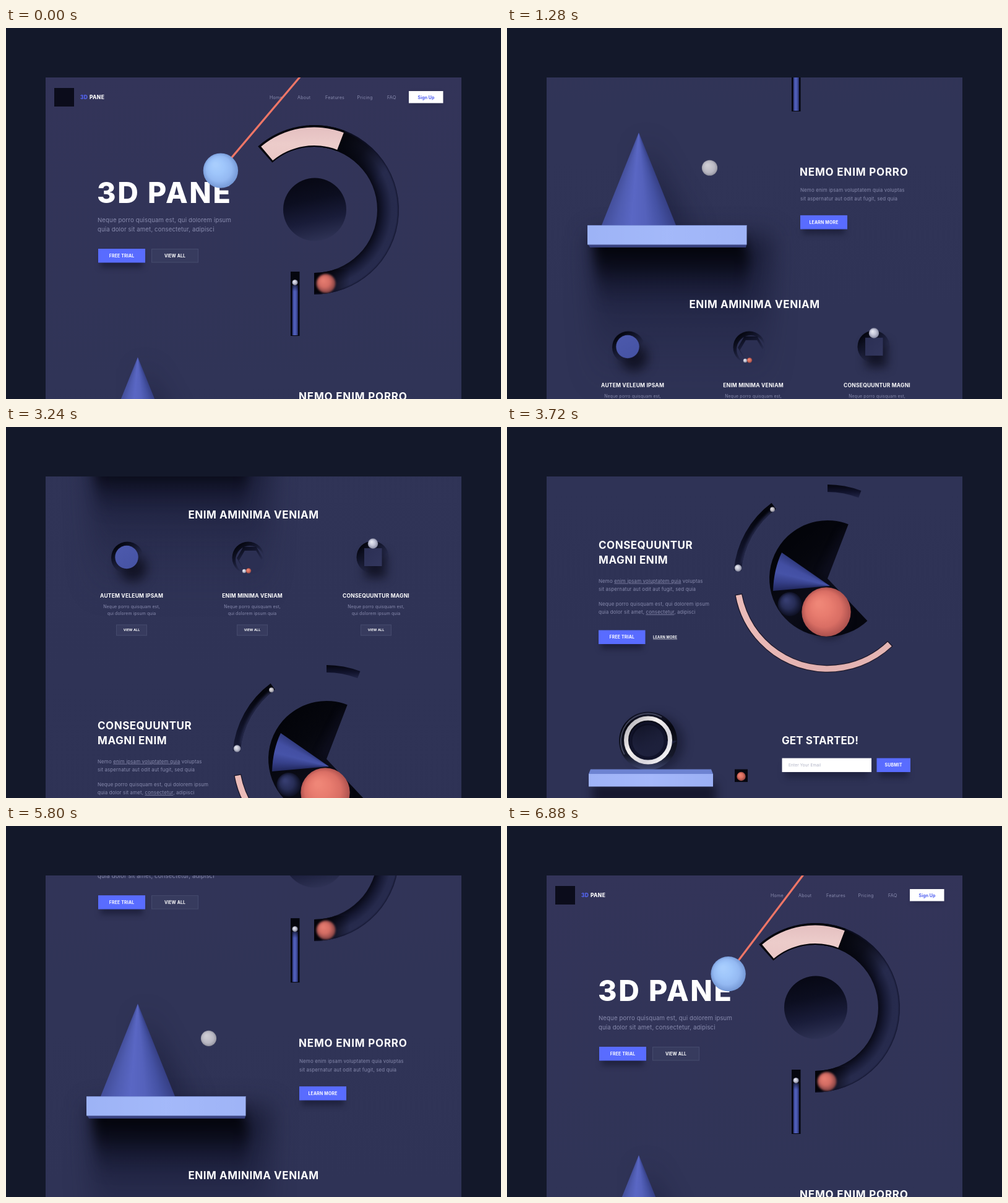
These frames come from a looping animation (800x600 px, 6.92 s). An HTML page with a canvas:

```html
<!DOCTYPE html>
<html lang="en">
<head>
<meta charset="utf-8">
<title>3D PANE</title>
<style>
  html, body { margin: 0; width: 100%; height: 100%; overflow: hidden; background: #13182a; }
  #view { position: absolute; left: 64px; top: 80px; width: 672px; height: 520px; overflow: hidden; background: #303457; }
  #page { position: absolute; left: -64px; top: -80px; width: 800px; height: 1580px; will-change: transform; }
  #page > * { position: absolute; left: 0; top: 0; }
  text { font-family: Inter, "Open Sans", sans-serif; white-space: pre; }
  .u { text-decoration: underline; }
</style>
</head>
<body>
<div id="view">
  <div id="page">
    <canvas id="scene" width="800" height="1580"></canvas>
    <svg id="copy" width="800" height="1580"></svg>
    <canvas id="actors" width="800" height="720"></canvas>
  </div>
</div>
<script>
const LOOP = 6920;
const BLUE = '#596cff', MUTED = '#888bae', WHITE = '#ffffff';
const page = document.getElementById('page');
const copy = document.getElementById('copy');
const g = document.getElementById('scene').getContext('2d');
const a = document.getElementById('actors').getContext('2d');
const rad = d => d * Math.PI / 180;

// ---- drawing helpers
function stops(f, colors, from = 0, to = 1) {
  colors.forEach((k, i) => f.addColorStop(from + (to - from) * i / (colors.length - 1), k));
  return f;
}
function fade(c, x0, y0, x1, y1, ...colors) {
  return stops(c.createLinearGradient(x0, y0, x1, y1), colors);
}
function glow(c, x0, y0, r0, x1, y1, r1, ...colors) {
  return stops(c.createRadialGradient(x0, y0, r0, x1, y1, r1), colors);
}
function sweep(x, y, d0, d1, ...colors) {
  return stops(g.createConicGradient(0, x, y), colors, d0 / 360, d1 / 360);
}
function rect(x, y, w, h, fill) {
  g.fillStyle = fill;
  g.fillRect(x, y, w, h);
}
function disc(c, x, y, r, fill) {
  c.beginPath();
  c.arc(x, y, r, 0, 7);
  c.fillStyle = fill;
  c.fill();
}
function ball(c, x, y, r, ...colors) {
  disc(c, x, y, r, glow(c, x - r * .3, y - r * .35, r * .1, x, y, r * 1.05, ...colors));
}
function poly(fill, ...p) {
  g.beginPath();
  for (let i = 0; i < p.length; i += 2) g.lineTo(p[i], p[i + 1]);
  g.closePath();
  g.fillStyle = fill;
  g.fill();
}
function band(x, y, r0, r1, d0, d1) {
  g.beginPath();
  g.arc(x, y, r1, rad(d0), rad(d1));
  g.arc(x, y, r0, rad(d1), rad(d0), true);
  g.closePath();
}
function soft(blur, draw) {
  g.save();
  g.filter = `blur(${blur}px)`;
  draw();
  g.restore();
}
function inside(draw) {
  g.save();
  g.clip();
  draw();
  g.restore();
}

// ---- text helpers
function text(str, x, y, size, weight, fill, spacing = 0, anchor = 'start') {
  const n = document.createElementNS('http://www.w3.org/2000/svg', 'text');
  const set = { x, y, fill, 'font-size': size, 'font-weight': weight, 'letter-spacing': spacing, 'text-anchor': anchor };
  for (const k in set) n.setAttribute(k, set[k]);
  str.split('_').forEach((part, i) => {
    const s = document.createElementNS(n.namespaceURI, 'tspan');
    s.textContent = part;
    if (i % 2) s.setAttribute('class', 'u');
    n.append(s);
  });
  copy.append(n);
}
const title = (s, x, y, gap = .55, anchor) => text(s, x, y, 17, 700, WHITE, gap, anchor);
const body = (s, x, y) => text(s, x, y, 7.9, 400, MUTED, .15);

function button(label, x, y, w, h = 22.5) {
  soft(5, () => rect(x + 4, y + 8, w - 8, h, 'rgba(14,16,38,.5)'));
  rect(x, y, w, h, BLUE);
  text(label, x + w / 2, y + h / 2 + 2.5, 6.9, 700, WHITE, .2, 'middle');
}
function ghost(x, y, w, h, size) {
  rect(x, y, w, h, '#373b5e');
  g.strokeStyle = '#454a6d';
  g.lineWidth = 1;
  g.strokeRect(x + .5, y + .5, w - 1, h - 1);
  text('VIEW ALL', x + w / 2, y + h / 2 + size * .37, size, 700, WHITE, .15, 'middle');
}

// ---- page sections
function header() {
  rect(78, 97, 32, 30, '#0b0c1b');
  text('3D', 120, 115, 8.4, 800, '#5566f5', .35);
  text('PANE', 135, 115, 8.4, 800, WHITE, .35);
  [['Home', 426], ['About', 471], ['Features', 516], ['Pricing', 567.5], ['FAQ', 616]]
    .forEach(([s, x]) => text(s, x, 114.8, 7.2, 400, MUTED, .2));
  soft(4, () => rect(655, 106, 48, 18, 'rgba(14,16,38,.25)'));
  rect(651, 102, 55.5, 19.5, WHITE);
  text('Sign Up', 679, 114.5, 7, 700, '#4c5cf0', .05, 'middle');
}

function hero() {
  text('3D PANE', 147, 283, 46.5, 800, WHITE, 2.6);
  text('Neque porro quisquam est, qui dolorem ipsum', 148, 314, 9.6, 400, MUTED, .14);
  text('quia dolor sit amet, consectetur, adipisci', 148, 329.3, 9.6, 400, MUTED, .14);
  button('FREE TRIAL', 149, 357, 76);
  ghost(235, 357, 76, 22.5, 6.9);

  const x = 498, y = 294;
  band(x, y, 102, 137, 228.5, 450);
  g.fillStyle = glow(g, x, y, 102, x, y, 137, '#090a18', '#171a35', '#262a4c', '#282c4f');
  g.fill();
  inside(() => {
    rect(490, 150, 150, 110, fade(g, 535, 175, 605, 240, '#030409', 'rgba(5,6,14,.75)', 'rgba(5,6,14,0)'));
    rect(498, 390, 60, 45, fade(g, 510, 0, 556, 0, '#04040a', 'rgba(4,4,10,0)'));
    soft(1, () => {
      g.beginPath();
      g.arc(x, y, 137, rad(-70), rad(90));
      g.strokeStyle = '#10122a';
      g.lineWidth = 2.5;
      g.stroke();
    });
    soft(1.6, () => ball(g, 517, 413, 15.5, '#e57c70', '#d36c63', '#7a3e40'));
  });
  band(x, y, 102, 137, 228.5, 291);
  g.fillStyle = '#05060d';
  g.fill();
  band(x, y, 104, 133.5, 230, 291);
  g.fillStyle = fade(g, 480, 160, 480, 215, '#e4bfc0', '#ecccca', '#e9c6c5');
  g.fill();

  disc(g, 499, 293.5, 51, fade(g, 486, 243, 508, 346, '#070814', '#0c0e20', '#191c39', '#303457'));

  rect(460, 394, 14.5, 104, '#05060e');
  rect(462.5, 416, 9.5, 81, fade(g, 462.5, 0, 472, 0, '#272d65', '#5060bd', '#4a58ae', '#20255a'));
  rect(462.5, 414, 9.5, 12, fade(g, 0, 414, 0, 426, 'rgba(5,6,14,.7)', 'rgba(5,6,14,0)'));
  ball(g, 467, 411.5, 4.6, '#e8e8f2', '#c2c3d4', '#6f7188');
}

function shelf() {
  soft(20, () => {
    rect(136, 700, 290, 260, fade(g, 0, 700, 0, 950, 'rgba(12,14,34,.72)', 'rgba(15,18,42,.45)', 'rgba(22,25,54,.2)', 'rgba(30,33,66,0)'));
    poly('rgba(14,16,40,.4)', 222, 545, 305, 700, 225, 700);
  });
  soft(9, () => poly(fade(g, 0, 712, 0, 812, 'rgba(2,3,8,1)', 'rgba(5,6,16,.75)', 'rgba(10,12,30,.3)', 'rgba(14,16,38,0)'),
    138, 700, 380, 700, 392, 735, 386, 812, 150, 812));
  poly(sweep(213, 532, 67, 113, '#343d80', '#4552a4', '#5562bc', '#5a67c4', '#505db2', '#424d98'),
    213, 532, 273, 682, 153, 682);
  poly('#39427f', 131, 713, 387.5, 713, 386, 718, 134, 718);
  rect(130, 682, 257.5, 31.5, fade(g, 130, 0, 388, 0, '#9db3f6', '#a4b9fa', '#9fb4f7'));
  rect(130, 682, 257.5, 1, '#8499df');

  title('NEMO ENIM PORRO', 473, 602, .8);
  body('Nemo enim ipsam voluptatem quia voluptas', 474, 628);
  body('sit aspernatur aut odit aut fugit, sed quia', 474, 641.5);
  button('LEARN MORE', 474, 666, 76);
}

function hole(x, y) {
  disc(g, x, y, 26, fade(g, x - 16, y - 20, x + 16, y + 22, '#05060f', '#15182f', '#2a2e50', '#303457'));
}
function hexagon(x, y, r, fill) {
  const p = [];
  for (let i = 0; i < 6; i++) p.push(x + r * Math.cos(rad(60 * i)), y + r * Math.sin(rad(60 * i)));
  poly(fill, ...p);
}

function cards() {
  title('ENIM AMINIMA VENIAM', 400, 816, .55, 'middle');

  hole(196, 879.5);
  soft(9, () => disc(g, 205, 896, 22, 'rgba(6,7,18,.7)'));
  disc(g, 195, 878.5, 18.7, fade(g, 185, 860, 205, 898, '#4c59ac', '#4653a4'));

  hole(391.5, 879.5);
  disc(g, 394, 883, 23, '#2b2f52');
  hexagon(394, 880, 21, fade(g, 384, 862, 396, 892, '#0a0c1c', '#1a1d38', '#2b2f52'));
  hexagon(395, 884, 18.5, '#2b2f52');
  ball(g, 385, 901, 3.3, '#ecedf5', '#c8c9d8', '#77798f');
  ball(g, 392, 900.5, 4.2, '#ed8473', '#d9705f', '#8d4541');

  hole(592.5, 878.5);
  soft(8, () => rect(580, 872, 34, 40, 'rgba(5,6,16,.65)'));
  rect(579, 864, 28.5, 29, fade(g, 579, 864, 607, 893, '#2b2f54', '#32365d'));
  ball(g, 593, 856.5, 8.2, '#e6e7f1', '#c3c5d8', '#85879f');

  [['AUTEM VELEUM IPSAM', 203], ['ENIM MINIMA VENIAM', 398], ['CONSEQUUNTUR MAGNI', 598]].forEach(([s, x]) => {
    text(s, x, 944, 8.5, 700, WHITE, .2, 'middle');
    text('Neque porro quisquam est,', x, 961, 6.9, 400, MUTED, .12, 'middle');
    text('qui dolorem ipsum quia', x, 972, 6.9, 400, MUTED, .12, 'middle');
    ghost(x - 25, 987.5, 50, 18, 5.3);
  });
}

function feature() {
  title('CONSEQUUNTUR', 148, 1157, .5);
  title('MAGNI ENIM', 148, 1181, .6);
  body('Nemo _enim ipsam voluptatem quia_ voluptas', 148, 1211.7);
  body('sit aspernatur aut odit aut fugit, sed quia', 148, 1225);
  body('Neque porro quisquam est, qui dolorem ipsum', 148, 1248.7);
  body('quia dolor sit amet, _consectetur_, adipisci', 148, 1262);
  button('FREE TRIAL', 148, 1288.5, 75.5);
  text('_LEARN MORE_', 236, 1301.8, 5.6, 700, WHITE, .25);

  const x = 518, y = 1205;
  band(x, y, 140, 152, 185, 233.5);
  g.fillStyle = fade(g, 395, 1100, 385, 1190, '#04050c', '#0d0f22', '#171a36');
  g.fill();
  inside(() => soft(2, () => {
    g.beginPath();
    g.arc(x, y, 140, rad(190), rad(230));
    g.strokeStyle = '#292d50';
    g.lineWidth = 5;
    g.stroke();
  }));
  ball(g, 373.5, 1188, 5.8, '#e6e7f0', '#c3c5d3', '#7c7e94');
  ball(g, 429, 1093.3, 4, '#e3dfe0', '#c2bfc5', '#77788a');

  band(x, y, 140, 152, 270, 291);
  g.fillStyle = fade(g, 0, 1053, 0, 1075, '#05060f', '#10122a', '#23274a');
  g.fill();

  band(x, y, 140, 152, 46, 170);
  g.fillStyle = '#191526';
  g.fill();
  band(x, y, 141.2, 150.8, 46.5, 169.5);
  g.fillStyle = fade(g, 375, 0, 620, 0, '#ebbcb9', '#e3b2b1', '#e5b6b4');
  g.fill();

  g.beginPath();
  g.moveTo(x, y);
  g.arc(x, y, 94, rad(46.7), rad(291));
  g.closePath();
  g.fillStyle = fade(g, 440, 1130, 545, 1270, '#020308', '#05060d', '#0b0c18', '#05060e');
  g.fill();
  inside(() => {
    soft(6, () => poly('rgba(24,27,52,.25)', 540, 1125, 560, 1120, 530, 1215, 505, 1195));
    g.beginPath();
    g.moveTo(444, 1163);
    g.lineTo(522, 1217);
    g.lineTo(430, 1225);
    g.quadraticCurveTo(431, 1190, 444, 1163);
    g.fillStyle = sweep(522, 1217, 174, 215, '#20265a', '#353f88', '#4653a8', '#434fa3', '#303a7e');
    g.fill();
    ball(g, 457, 1246.5, 19.5, '#363d70', '#272d56', '#0b0d1e');
  });
  soft(5, () => disc(g, 520, 1268, 36, 'rgba(12,10,24,.4)'));
  ball(g, 516, 1259, 39.7, '#ef8677', '#e87c6f', '#d96e64', '#a64d4b');
}

function signup() {
  soft(8, () => {
    rect(138, 1536, 200, 34, 'rgba(7,8,22,.6)');
    disc(g, 242, 1470, 44, 'rgba(10,12,30,.45)');
  });
  const x = 228, y = 1467.5;
  g.beginPath();
  g.arc(x, y, 47, 0, 7);
  g.arc(x, y, 26, 0, 7, true);
  g.fillStyle = fade(g, x, 1420, x, 1515, '#14162b', '#070811', '#10121f', '#151829', '#3f476f');
  g.fill();
  g.lineWidth = 2;
  g.strokeStyle = 'rgba(110,114,142,.55)';
  g.beginPath();
  g.arc(x, y, 44, rad(150), rad(300));
  g.stroke();
  soft(.6, () => {
    g.beginPath();
    g.arc(x, y - 1, 35.5, 0, 7);
    g.lineWidth = 7;
    g.strokeStyle = fade(g, 195, 1440, 262, 1500, '#b9b7bd', '#f4f0ef', '#d8d6dd', '#ffffff');
    g.stroke();
  });
  g.beginPath();
  g.arc(x, y, 28, 0, 7);
  g.lineWidth = 5;
  g.strokeStyle = '#11132a';
  g.stroke();
  inside(() => rect(200, 1440, 58, 56, fade(g, 215, 1445, 240, 1495, 'rgba(8,9,22,.5)', 'rgba(40,44,78,0)')));

  poly('#6d83d2', 135, 1513.5, 330, 1513.5, 333, 1521, 132, 1521);
  rect(132, 1521, 201, 20.5, fade(g, 132, 0, 333, 0, '#9fb3f7', '#a5b8fb', '#9bb0f5'));

  rect(368, 1513.5, 21, 20.5, '#07070f');
  ball(g, 378.5, 1525, 7.2, '#ee8270', '#dc6e60', '#8c413c');

  title('GET STARTED!', 444, 1473, .1);
  soft(6, () => rect(450, 1506, 134, 20, 'rgba(14,16,38,.45)'));
  rect(444.5, 1495.5, 144.5, 22.5, WHITE);
  text('Enter Your Email', 455, 1509, 6.4, 400, '#aeb1c4', .2);
  button('SUBMIT', 597.5, 1495.5, 54.5);
}

function paint() {
  rect(64, 0, 672, 1580, fade(g, 0, 80, 0, 1560, '#333459', '#303457', '#2f3356', '#2e3255'));
  [header, hero, shelf, cards, feature, signup].forEach(draw => draw());
}

// ---- motion
function ease(t, mid, half) {
  const u = Math.max(-1, Math.min(1, (t - mid) / half));
  return u < 0 ? (1 + u) ** 9 / 2 : 1 - (1 - u) ** 9 / 2;
}
function scrollAt(t) {
  return 400 * ease(t, 1096, 1080) + 560 * ease(t, 3244.4, 700) - 960 * ease(t, 5723.2, 1080);
}
function pendulum(t) {
  const time = t < LOOP / 2 ? t : t - LOOP;
  const swing = rad(-47 * Math.cos(time / 2133 * 2 * Math.PI - rad(31.3)));
  const x = 509 + 251 * Math.sin(swing), y = 39 + 251 * Math.cos(swing);
  a.beginPath();
  a.moveTo(509, 39);
  a.lineTo(x, y);
  a.lineWidth = 3.2;
  a.strokeStyle = '#ee7667';
  a.stroke();
  ball(a, x, y, 28.2, '#a8cdfd', '#9fc6fb', '#94b9f2', '#7194d2');
}
function bounce(t) {
  const p = ((t - 2000) / 760 % 1 + 1) % 1;
  const q = Math.min(p, 1 - p);
  ball(a, 327.5, 588.3 + 81 * 4 * q * q, 12.6, '#cecdd4', '#c5c4cc', '#b9b8c3', '#94949f');
}
function frame(now) {
  const t = now % LOOP;
  a.clearRect(0, 0, 800, 720);
  bounce(t);
  pendulum(t);
  page.style.transform = `translateY(${-scrollAt(t).toFixed(2)}px)`;
  requestAnimationFrame(frame);
}

paint();
frame(performance.now());
</script>
</body>
</html>
```
